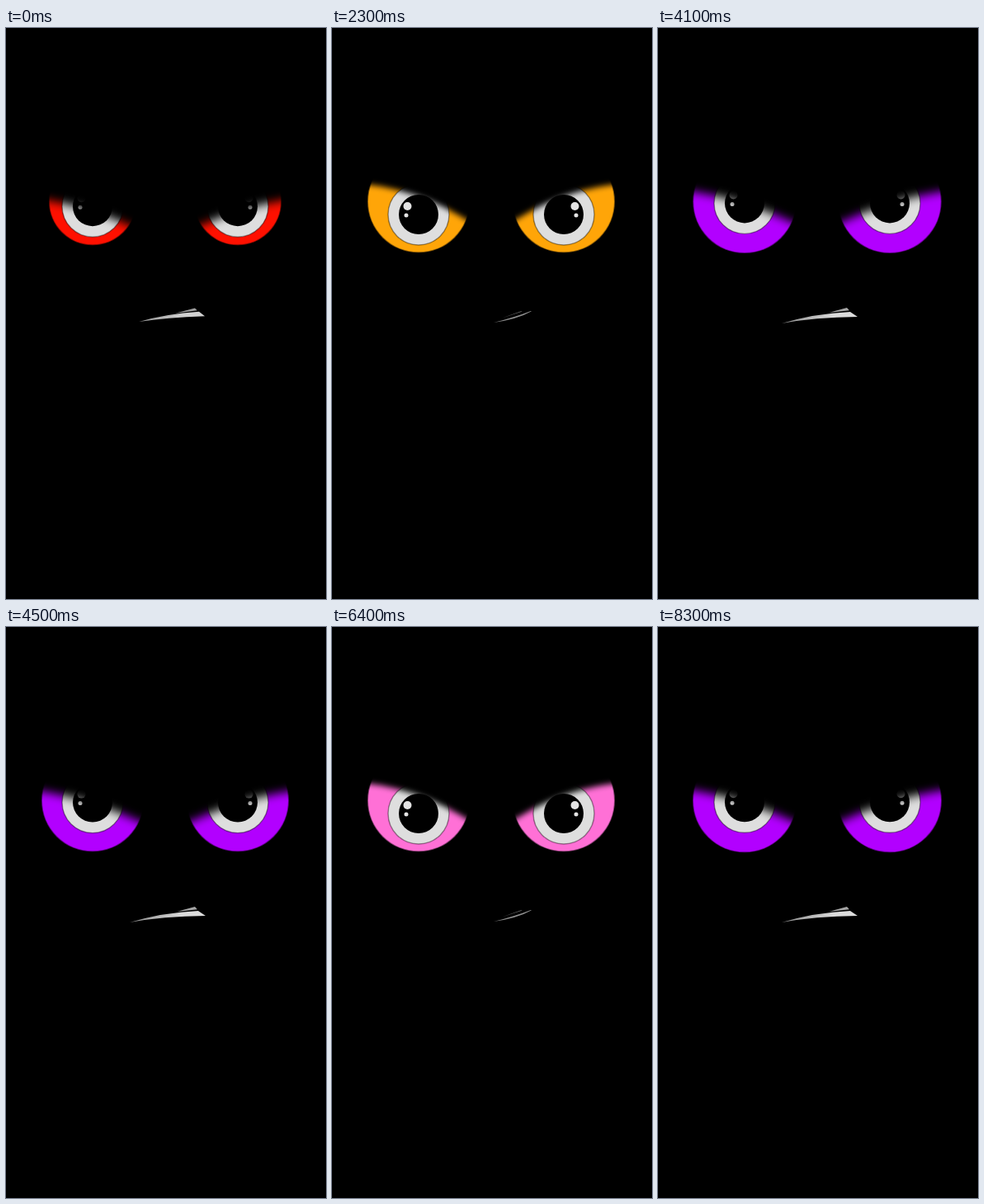
Recreate the animation shown at these times as an HTML page. Size 388x692 px, loop 8400 ms.

```html
<!DOCTYPE html>
<html lang="en">
<head>
<meta charset="utf-8">
<title>Scowling eyes</title>
<style>
  html, body { margin: 0; height: 100%; overflow: hidden; background: #000; }
  svg { display: block; width: 100vw; height: 100vh; }
</style>
</head>
<body>
<svg viewBox="0 0 388 692">
  <defs>
    <filter id="soft" filterUnits="userSpaceOnUse" x="-30" y="60" width="270" height="240">
      <feGaussianBlur id="blur"/>
    </filter>
    <linearGradient id="steel" gradientUnits="userSpaceOnUse" x1="150" y1="0" x2="215" y2="0">
      <stop offset="0" stop-color="#8c8c8c"/>
      <stop offset="1" stop-color="#dcdcdc"/>
    </linearGradient>
    <g id="eye">
      <circle id="ball" cx="105" cy="210.3" stroke="#000" stroke-opacity=".45" stroke-width="2"/>
      <g id="iris">
        <circle cx="105" r="37" fill="#dedede" stroke="#000" stroke-opacity=".4" stroke-width="1.4"/>
        <circle cx="105" r="24"/>
        <circle cx="91.5" cy="-10" r="5" fill="#e4e4e4"/>
        <circle cx="90" cy="1" r="2.5" fill="#e4e4e4"/>
      </g>
      <path id="lid" filter="url(#soft)"/>
    </g>
  </defs>
  <use href="#eye"/>
  <use href="#eye" transform="translate(386 0) scale(-1 1)"/>
  <g id="mouth" fill="url(#steel)">
    <path id="blade"/>
    <path id="fang" opacity=".75"/>
  </g>
</svg>
<script>
const LOOP = 8400, STEP = 100, FULL = 62;
const RED = [255, 16, 0], ORANGE = [255, 165, 8], PURPLE = [178, 0, 255],
      MAGENTA = [217, 17, 255], PINK = [255, 112, 214];

// time, eyeball radius, scowl (0 smirk, 1 sneer), colour
const keys = [
  [0, 53, .87, RED], [100, 61, 1, RED], [200, 64, 1, RED],
  [400, 61.5, 1, RED], [700, 62, 1, RED], [1700, 62, 1, RED],
  [1900, 55, 1, [255, 55, 0]], [2000, 47, .5, [255, 110, 0]],
  [2200, 63.5, 0, ORANGE], [2300, 62, 0, ORANGE], [3400, 62, 0, ORANGE],
  [3800, 47, .4, ORANGE], [3900, 61, .95, PURPLE], [4000, 64, 1, PURPLE],
  [4200, 61.5, 1, PURPLE], [4500, 62, 1, PURPLE], [5800, 62, 1, PURPLE],
  [6000, 55, 1, MAGENTA], [6100, 47, .5, [235, 60, 235]],
  [6300, 63.5, 0, PINK], [6400, 62, 0, PINK], [7800, 62, 0, PINK],
  [8200, 47, .4, PINK], [8300, 63, 1, PURPLE], [LOOP, 63, 1, PURPLE]
];

const get = id => document.getElementById(id);
const set = (id, name, value) => get(id).setAttribute(name, value);
const mix = (a, b, k) => a + (b - a) * k;

function pose(t) {
  const i = keys.findIndex(key => key[0] > t);
  const [t0, r0, m0, c0] = keys[i - 1], [t1, r1, m1, c1] = keys[i];
  const u = (t - t0) / (t1 - t0), k = u * u * (3 - 2 * u);
  return [mix(r0, r1, k), mix(m0, m1, k), c0.map((c, n) => Math.round(mix(c, c1[n], k)))];
}

function draw(t) {
  const [r, m, color] = pose(t);
  const shrink = FULL - r;
  set('ball', 'r', r);
  set('ball', 'fill', `rgb(${color})`);
  set('iris', 'transform', `translate(0 ${226 - 13.4 * Math.sqrt(m) + .3 * shrink})`);

  // the lid drops as the eyeball shrinks and softens with the scowl
  const drop = shrink * 1.1, outer = 188 + drop + 8 * m;
  set('lid', 'd', `M0 ${outer}H20Q100 ${190 + drop + 15 * m} 175 ${240 + drop + 2 * m}` +
    `L210 ${262 + drop}V90H0Z`);
  set('blur', 'stdDeviation', 3.7 + 2.3 * m);

  const arc = 4 * m * (1 - m);
  const tip = `${196 - 46 * m * m} ${357 + m - 4 * arc}`;
  const corner = `${242 - 2 * arc} ${343.3 + 6.7 * m}`;
  set('blade', 'd', `M${tip}Q${mix(222, 190, m)} ${mix(350.5, 346, m)} ${241 - 8 * m} ${343 + m}` +
    `L${corner}Q${mix(225, 190, m)} ${mix(353, 350.5, m)} ${tip}Z`);
  set('fang', 'd', `M${mix(206, 207, m) - 4 * arc} ${mix(351.5, 345, m)}` +
    `L229 ${mix(343.3, 339, m)}L${mix(231, 232, m)} ${mix(343.5, 342.2, m)}Z`);
  set('mouth', 'opacity', .65 + .35 * m);
}

function tick() {
  draw(Math.floor(performance.now() % LOOP / STEP) * STEP);
  requestAnimationFrame(tick);
}
tick();
</script>
</body>
</html>
```
